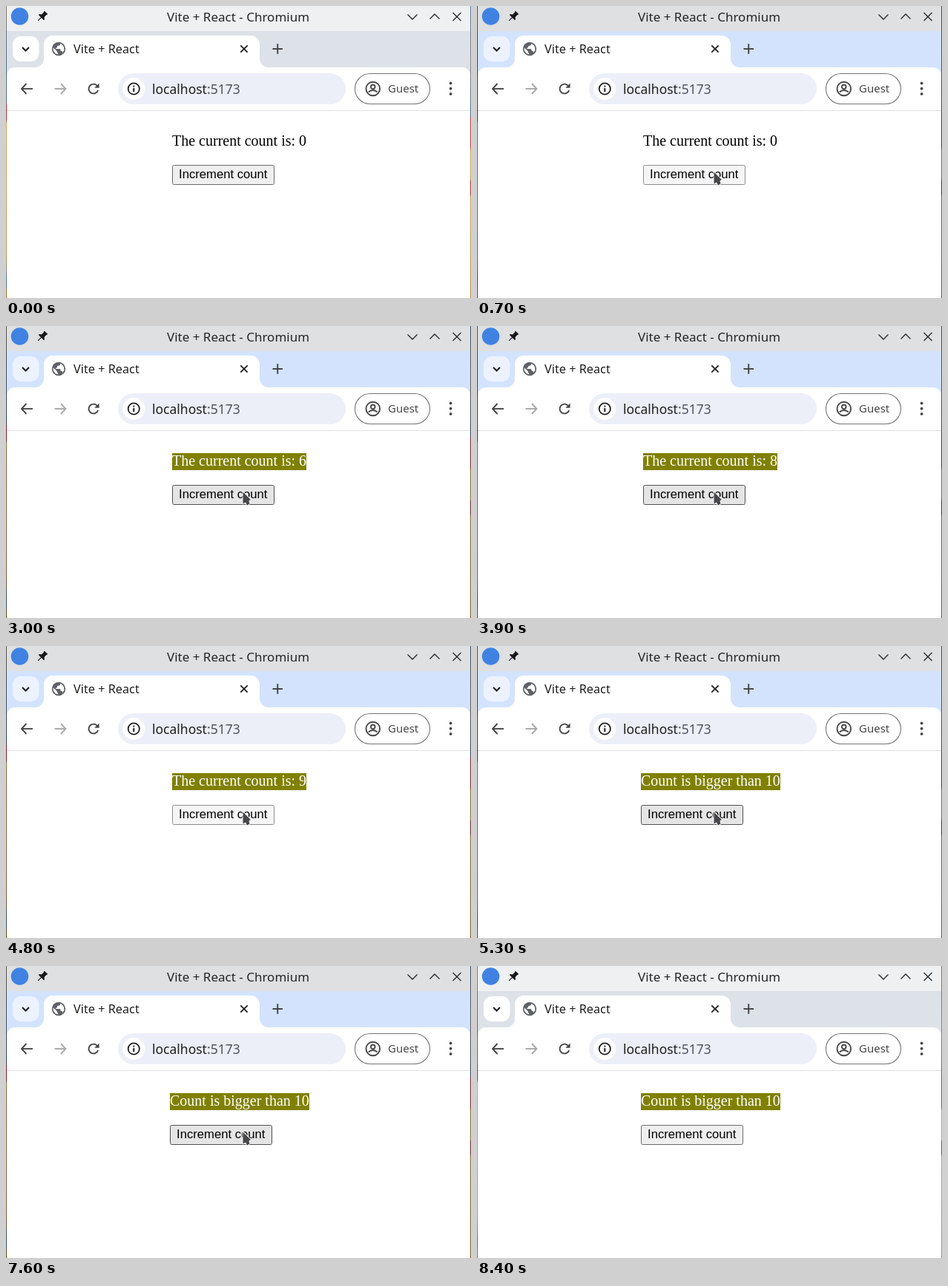
Animation, 627 px wide and 395 px high, one loop 8.5 s. Source, as an HTML page with a canvas:

```html
<!DOCTYPE html>
<html lang="en">
<head>
<meta charset="utf-8">
<title>Counter demo</title>
<style>
html, body { margin: 0; width: 100%; height: 100%; overflow: hidden; background: #fff; }
canvas { display: block; }
</style>
</head>
<body>
<canvas id="stage" width="627" height="395"></canvas>
<script>
const ctx = document.getElementById('stage').getContext('2d');
const W = 627, H = 395, LOOP = 8500;
const SANS = '"Noto Sans", sans-serif';
const INK = '#1f1f1f', GREY = '#474747';

// Mouse button goes down and comes up again at these times.
const presses = [700, 1100, 1600, 2000, 2500, 2900, 3400, 3800, 4300, 4800,
  5200, 5700, 6100, 6600, 7000, 7400];
const releaseOf = down => down + (down === 7400 ? 200 : 100);

// Time and tip position; the pointer is absent before the first and after the last.
const pointerPath = [[100, 390, 336], [200, 347, 266], [300, 325, 234],
  [400, 319, 224], [7800, 144, 40]];

const buttonLooks = {
  normal: ['#efefef', '#6b6b6b'],
  hover: ['#e5e5e5', '#4f4f4f'],
  active: ['#f5f5f5', '#8d8d8d']
};

function rect(x, y, w, h, color) {
  ctx.fillStyle = color;
  ctx.fillRect(x, y, w, h);
}

function roundRect(x, y, w, h, radius, color, border) {
  ctx.beginPath();
  ctx.roundRect(x, y, w, h, radius);
  if (color) { ctx.fillStyle = color; ctx.fill(); }
  if (border) { ctx.strokeStyle = border; ctx.stroke(); }
}

function disc(x, y, r, color) {
  ctx.beginPath();
  ctx.arc(x, y, r, 0, 7);
  ctx.fillStyle = color;
  ctx.fill();
}

function ring(x, y, r, color, width) {
  ctx.beginPath();
  ctx.arc(x, y, r, 0, 7);
  ctx.strokeStyle = color;
  ctx.lineWidth = width;
  ctx.stroke();
}

function trace(points) {
  ctx.beginPath();
  points.forEach(([x, y]) => ctx.lineTo(x, y));
}

function line(points, color, width) {
  trace(points);
  ctx.strokeStyle = color;
  ctx.lineWidth = width;
  ctx.stroke();
}

function shape(points, color) {
  trace(points);
  ctx.closePath();
  ctx.fillStyle = color;
  ctx.fill();
}

function cross(x, y, r, color, width) {
  line([[x - r, y - r], [x + r, y + r]], color, width);
  line([[x + r, y - r], [x - r, y + r]], color, width);
}

function text(string, x, y, font, color) {
  ctx.font = font;
  ctx.fillStyle = color;
  ctx.fillText(string, x, y);
  return ctx.measureText(string).width;
}

function drawEdge(x, stops, focused) {
  const fill = ctx.createLinearGradient(0, 0, 0, H);
  stops.forEach(([y, color]) => fill.addColorStop(y / H, color));
  rect(x, 0, 1, H, fill);
  if (focused) rect(x, 0, 1, H, 'rgba(0,0,0,.35)');
}

function drawPin() {
  ctx.save();
  ctx.translate(49.5, 13.5);
  ctx.rotate(Math.PI / 4);
  shape([[-3, -6.5], [3, -6.5], [3, -5], [2.5, -4.5], [2.5, -.5], [5, 1.5],
    [5, 3], [.6, 3], [.6, 9], [-.6, 9], [-.6, 3], [-5, 3], [-5, 1.5],
    [-2.5, -.5], [-2.5, -4.5], [-3, -5]], '#16191b');
  ctx.restore();
}

function drawTitleBar(focused) {
  rect(1, 0, W - 2, 34, focused ? '#dee0e2' : '#eff0f1');
  disc(18.5, 14, 11.8, '#3f82e2');
  drawPin();
  text('Vite + React - Chromium', 217, 21, '17px ' + SANS, '#232629');
  line([[541.5, 11.5], [548, 18], [554.5, 11.5]], '#232629', 1.25);
  line([[571.5, 17.5], [578, 11], [584.5, 17.5]], '#232629', 1.25);
  cross(608, 14.5, 5.5, '#232629', 1.25);
}

function drawGlobe(x, y) {
  disc(x, y, 9.2, '#5f6368');
  shape([[x - 7.4, y - 1.5], [x - 2.4, y + 3], [x - 2.2, y + 4.8], [x - .8, y + 6],
    [x - .8, y + 7.4], [x - 4.6, y + 6], [x - 7.3, y + 2]], '#fff');
  shape([[x + 2, y - 7], [x + 1.8, y - 5], [x - 1.8, y - 3.8], [x - 2, y - 1.8],
    [x - 3.8, y - 1.4], [x - 3.6, y], [x + 2, y], [x + 2.8, y + 2.8], [x + 4.5, y + 3],
    [x + 5.4, y + 5], [x + 7.4, y + 1.4], [x + 7, y - 2.6], [x + 5, y - 5.5]], '#fff');
}

function drawTabs(focused) {
  rect(1, 34, W - 2, 60, focused ? '#d3e3fd' : '#dde1e8');
  roundRect(9, 41, 35.5, 34, 11, focused ? '#ecf3fe' : '#fff');
  line([[22, 56], [26.5, 60.5], [31, 56]], INK, 2.1);

  ctx.beginPath();
  ctx.moveTo(39, 83);
  ctx.arcTo(51, 83, 51, 71, 12);
  ctx.arcTo(51, 40, 63, 40, 12);
  ctx.arcTo(342, 40, 342, 52, 12);
  ctx.arcTo(342, 83, 354, 83, 12);
  ctx.closePath();
  ctx.fillStyle = '#fff';
  ctx.fill();

  drawGlobe(71, 58);
  text('Vite + React', 91, 64, '16.25px ' + SANS, INK);
  cross(321, 58, 4.7, INK, 1.8);
  line([[359.5, 58], [373, 58]], GREY, 2);
  line([[366.25, 51.25], [366.25, 64.75]], GREY, 2);
}

function drawArrow(x, direction, color) {
  const y = 112;
  line([[x - 7.5, y], [x + 7.5, y]], color, 1.9);
  line([[x + direction, y - 7], [x + direction * 7.5, y], [x + direction, y + 7]], color, 1.9);
}

function drawReload(x, y) {
  ctx.beginPath();
  ctx.arc(x, y, 6.4, .3, Math.PI * 1.78);
  ctx.strokeStyle = GREY;
  ctx.lineWidth = 1.9;
  ctx.stroke();
  shape([[x + 7.6, y - 7.5], [x + 7.6, y - 1.2], [x + 1.2, y - 1.2]], GREY);
}

function drawToolbar() {
  roundRect(1, 83, W - 2, 58, [11, 11, 0, 0], '#fff');
  drawArrow(28.5, -1, GREY);
  drawArrow(73, 1, '#a8a8a8');
  drawReload(118, 112);

  roundRect(151, 91, 307, 42, 21, '#eceff8');
  disc(172.3, 112, 15, '#fff');
  ring(172.3, 112, 7.6, INK, 1.8);
  rect(171.3, 111, 2, 5.2, INK);
  rect(171.3, 107.6, 2, 2, INK);
  const hostWidth = text('localhost', 197, 119, '17.5px ' + SANS, INK);
  text(':5173', 197 + hostWidth, 119, '17.5px ' + SANS, '#50535a');

  ctx.lineWidth = 1.1;
  roundRect(470.5, 91.5, 101, 41, 20.5, null, '#747775');
  ring(494.8, 112, 9.3, GREY, 1.9);
  ring(494.8, 109.3, 2.8, GREY, 1.9);
  ctx.beginPath();
  ctx.arc(494.8, 122, 8, Math.PI * 1.24, Math.PI * 1.76);
  ctx.stroke();
  text('Guest', 515, 117, '15px ' + SANS, GREY);
  [104.5, 111.7, 118.9].forEach(y => disc(599.6, y, 1.9, GREY));
}

function drawPage(count, look) {
  rect(1, 141, W - 2, H - 141, '#fff');
  rect(1, 141, W - 2, 1, '#dde0e5');

  const message = count > 10 ? 'Count is bigger than 10' : 'The current count is: ' + count;
  const font = '20px "Liberation Serif", serif';
  ctx.font = font;
  const width = ctx.measureText(message).width;
  const left = Math.round(314.5 - width / 2);
  const highlighted = count > 5;
  if (highlighted) rect(left, 172, Math.round(width), 23, '#808000');
  text(message, left, 189, font, highlighted ? '#fff' : '#000');

  const [face, border] = buttonLooks[look];
  ctx.lineWidth = 1;
  roundRect(left + .5, 215.5, 137, 26, 2, face, border);
  text('Increment count', left + 9, 233, '16.667px "Liberation Sans", sans-serif', '#000');
}

function drawPointer(x, y) {
  ctx.save();
  ctx.translate(x, y);
  const outline = [[.5, .5], [.5, 16.5], [4, 14.5], [6, 18.5], [9.5, 16.5],
    [8.5, 12.5], [11, 11]];
  trace(outline);
  ctx.closePath();
  ctx.lineJoin = 'round';
  ctx.strokeStyle = 'rgba(255,255,255,.9)';
  ctx.lineWidth = 2;
  ctx.stroke();
  ctx.fillStyle = '#47474a';
  ctx.fill();
  ctx.restore();
}

function draw(t) {
  const focused = t >= 700 && t < 8400;
  const count = presses.filter(down => t >= releaseOf(down)).length;
  const pressed = presses.some(down => t >= down && t < releaseOf(down));
  const hovering = t >= 300 && t < 7800;

  ctx.clearRect(0, 0, W, H);
  drawEdge(0, [[0, '#8d7f6a'], [60, '#54718f'], [130, '#4a6685'], [136, '#b52b35'],
    [154, '#b52b35'], [158, '#c9a25a'], [340, '#bd9450'], [371, '#4d7396'],
    [380, '#4d7396'], [384, '#8c7a32'], [395, '#8c7a32']], focused);
  drawEdge(W - 1, [[0, '#5b7795'], [80, '#8a8484'], [148, '#4a7192'], [152, '#b8403f'],
    [190, '#b8403f'], [196, '#c9a25a'], [234, '#c9a25a'], [238, '#a83a3c'],
    [254, '#a83a3c'], [258, '#c8a05a'], [395, '#b58c48']], focused);
  drawTitleBar(focused);
  drawTabs(focused);
  drawToolbar();
  drawPage(count, pressed ? 'active' : hovering ? 'hover' : 'normal');

  const spot = pointerPath.filter(([start]) => t >= start).pop();
  if (spot && t < 7900) drawPointer(spot[1], spot[2]);
}

function tick() {
  draw(performance.now() % LOOP);
  requestAnimationFrame(tick);
}
tick();
</script>
</body>
</html>
```
